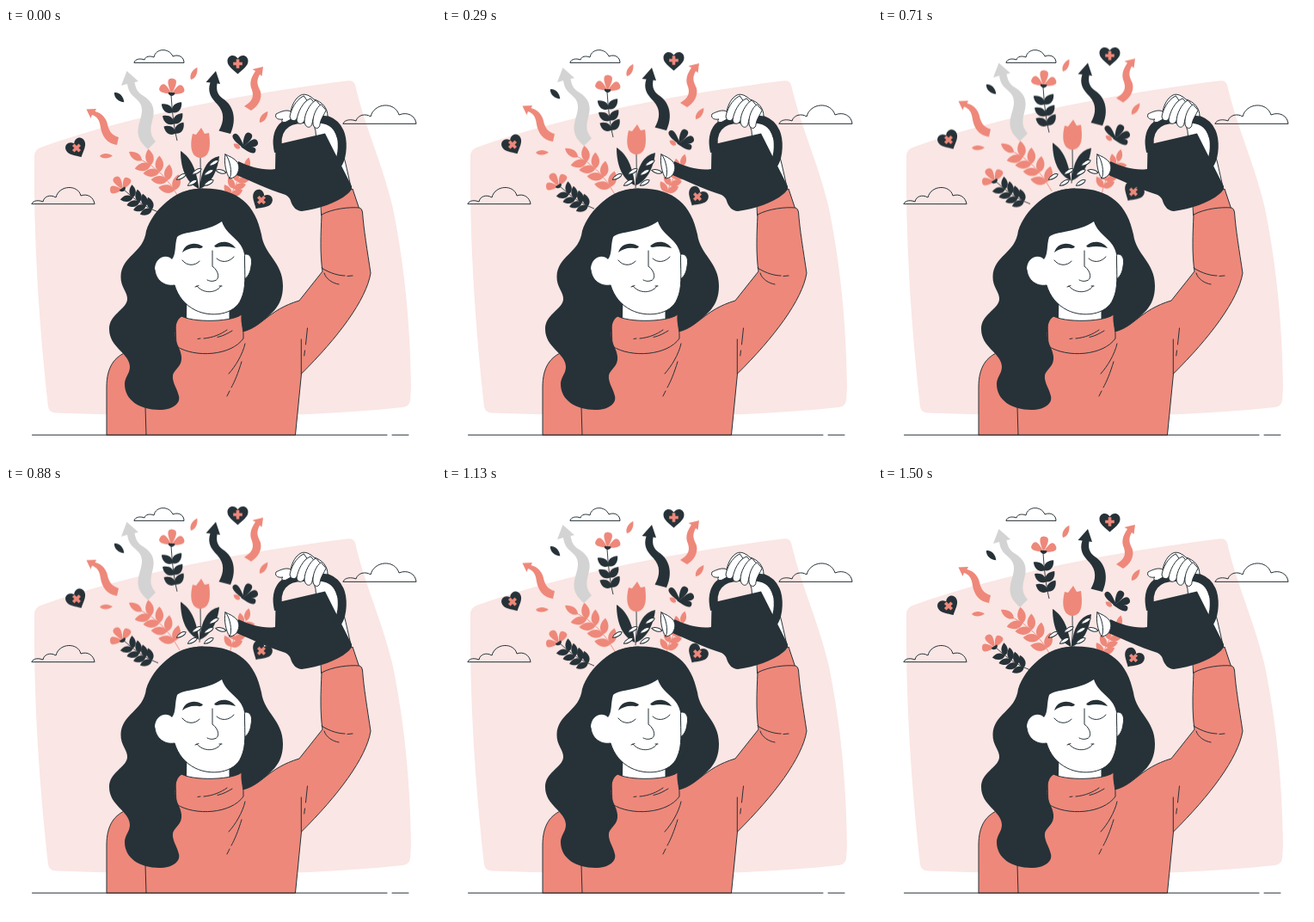
Animation, 500 px wide and 500 px high, one loop 1.54 s. Source, as an HTML page:

```html
<!DOCTYPE html>
<html lang="en">
<head>
<meta charset="utf-8">
<title>Watering thoughts</title>
<style>
html, body { margin: 0; width: 100%; height: 100%; overflow: hidden; background: #fff; }
svg { display: block; width: 100vw; height: 100vh; }
.dark { fill: #263238; }
.coral { fill: #ee887a; }
.grey { fill: #d3d3d3; }
.white { fill: #fff; }
.none { fill: none; }
.line { stroke: #263238; stroke-width: 1; stroke-linecap: round; stroke-linejoin: round; }
.stem { fill: none; stroke: #263238; stroke-width: .9; }
.stem.pale { stroke: #ee887a; }
#drops { stroke-width: .7; }
</style>
</head>
<body>
<svg viewBox="0 0 500 500">
  <path fill="#fae6e4" d="M33 149Q33 142 40 139C150 100 280 76 396 61.500Q404 60 406 66C417 115 437 155 450 210C463 275 470 340 471 418L470 433Q469 440 461 441C330 455 200 452 57 447.500Q50 447 49 440C39 350 32 250 33 149Z"/>

  <g class="none line">
    <path d="M149 40C150 36 156 35 161 37C162 33 167 32 172 34C174 23 190 23 194 33C201 30 207 34 207 40Z"/>
    <path d="M392 111C394 106 402 106 407 108C409 101 418 99 424 103C428 87 452 85 457 101C467 97 476 102 477 111Z"/>
    <path d="M30 204.300C32 200 38 200 43 202C44 196 51 193 58 197C62 182 84 182 87 195C95 192 102 197 103 204.300Z"/>
  </g>

  <g id="ideas">
    <path class="grey" d="M140.500 50L154 62L149.500 63C151 71 153 75 160 79C171 86 174 95 170 108C167 119 168 125 174 132L165 141C156 133 152 126 154 115C156 105 162 94 154 85C149 79 143 78 141 65L134 67Z"/>
    <path class="dark" d="M244 50L249 65L245.500 64.500C244 74 247 78 252 82C266 91 268 108 261 123L247.500 119.500C254 108 254 98 246 89C238 81 234 74 237.500 63.500L232.500 63Z"/>
    <path class="coral" d="M299 45L297.500 56L295 54C290 63 293 67 296 74C298 83 293 91 285 96L277 91C285 86 289 81 286 72C283 65 284 59 290 50L286.500 48Z"/>
    <path class="coral" d="M93.500 94.500L105 94L103.500 97C112 99 117 106 118 112C120 121 124 125 131 127L129 136C117 134 112 126 110 116C109 107 106 103 100 101L98.500 105Z"/>
  </g>

  <g id="drops" class="white"></g>

  <!-- raised arm, cuff and watering can -->
  <path class="white line" d="M352 92L369 94C379 109 390 137 395 158L402 189L367 200L360 120Z"/>
  <path class="coral line" d="M366 198C380 197 394 193 403 187L411 211L367 218Z"/>
  <path class="dark" d="M313.500 139Q313.500 136 317 135L371 122.500L402 184Q403 188 397 193C384 204 364 210 344 213C338 213 333 208 331 201Q330 197 325 194C303 187 285 178 268 171L270 155C285 162 300 166 313 164Z"/>
  <path class="none" stroke="#263238" stroke-width="10" d="M317 144C311 118 325 106 345 106C371 103 382 108 388 121C392 130 392 148 386 158"/>
  <path class="white line" d="M255 147C260 149 266 152 269 156C272 161 271 166 268 171C265 174 262 175 260 175C256 169 253 156 255 147Z"/>
  <path class="none line" d="M255 147C260 151 264 169 260 175"/>
  <path class="white line" d="M331 97C326 94 318 98 314 100C312 105 317 107 322 106C319 108 322 111 326 109L335 104C345 100 357 99 365 102L374 103C374 93 368 86 358 83C353 78 347 76 343 78C337 81 333 88 331 97Z"/>
  <g class="white line">
    <path d="M346 79C337 83 331 96 330 103C331 109 337 109 339 104C341 97 346 91 350 85Z"/>
    <path d="M354 82C345 85 339 99 338 107C339 113 345 112 347 108C349 100 354 94 358 87Z"/>
    <path d="M360 84C353 88 347 100 347 109C348 117 355 117 356 111C357 103 362 96 366 91Z"/>
    <path d="M366 89C361 92 356 103 357 112C359 119 365 117 365 112C366 105 370 101 372 96Z"/>
  </g>

  <!-- back hair -->
  <path class="dark" d="M229 186.500C270 186 290 206 297 240C300 264 322 272 322 300C322 326 305 333 301 340L290 354L198 362L170 225C185 200 200 187 229 186.500Z"/>

  <!-- sweater -->
  <path class="coral line" d="M117 473L117 418C117 394 126 382 142 376L200 355L275 353C298 348 304 328 341 317L368 283C365 262 366 240 367 217C380 210 399 208 411 209Q414 210 414.500 214C416 235 420 258 424 285C419 316 386 360 343.500 402L336.500 473Z"/>
  <path class="white" d="M209 312L209 342L260 342L260 318Z"/>
  <path class="none line" d="M209.500 318V340M260 322V340"/>
  <path class="coral line" d="M201 332C206 343 262 343 274 333C273 344 277 352 276 361C262 381 220 384 198 370L197 345Z"/>
  <g class="none line">
    <path d="M343.300 362V402M350.500 349L348.500 368M347.500 375L346.800 381M162 440L163 473"/>
    <path d="M367 279C378 286 388 288 394 288M397 288.500L403 288M370 285C372 292 380 297 387 298"/>
    <path d="M223 361.500L226 361M230 361C241 360 250 356 257 351M246 359.500C253 358 258 355 263 352"/>
    <path d="M278 367C275 380 267 393 259 402M274 388C270 401 266 411 262 418M260 422L257 428"/>
  </g>

  <!-- front hair and long lock -->
  <path class="dark" d="M229 186.500C197 187 171 211 163 236C160 262 134 265 133.500 289C133 301 142 308 141 316C139 328 120 333 120 350C120 372 144 378 144 394C144 402 138 406 138 414C138 433 156 444 178 444C195 444 203 436 201 428C199 419 193 412 194 404C196 396 205 394 204 382C203 371 195 366 197 350C198 340 203 333 210 335L212 240L260 230Z"/>

  <!-- face -->
  <path class="white line" d="M278 263C284 262 287 268 285 277C284 285 281 290 277 292Z"/>
  <path class="white" d="M251 225C257 243 275 245 277.500 265C277.500 288 279.500 302 273.500 315C266 334 238 337 220 328C208 322 200 312 196 299C184 301 174 293 173 281C173 267 186 262 193 269C198 263 196 252 199 243C206 236 232 238 251 225Z"/>
  <path class="none line" d="M277.500 265C277.500 288 279.500 302 273.500 315C266 334 238 337 220 328C208 322 200 312 196 299C184 301 174 293 173 281"/>
  <path class="dark" d="M205 261C208 250 220 248 229 254C228 256 226 256.500 224 256C216 255 210 257 205 261ZM242.500 253C250 246 262 248 267 256C260 254 253 253 245 255C243 255 242 254 242.500 253Z"/>
  <g class="none line">
    <path d="M205 270C210 277 220 277 225 271M245 268C250 273 259 273 265 266"/>
    <path d="M240 259L240 277C248 283 249 293 242 294C239 295 236 294 234 293"/>
    <path d="M222 300C229 309 244 309 250 300M220 301L224 299.500M248 300L251 300"/>
  </g>

  <path class="none line" d="M30.500 473.200H443M449 473.200H468"/>
</svg>
<script>
const ideas = document.getElementById('ideas');
const drops = document.getElementById('drops');

function add(parent, cls, d, transform) {
  const path = document.createElementNS(parent.namespaceURI, 'path');
  path.setAttribute('class', cls);
  path.setAttribute('d', d);
  if (transform) path.setAttribute('transform', transform);
  parent.append(path);
}

const place = (x, y, turn) => `translate(${x} ${y}) rotate(${turn})`;

// Pointed leaf from its base, along the given angle.
function leaf(x, y, turn, len, wide, cls) {
  add(ideas, cls, `M0 0C${len * .25} ${-wide} ${len * .7} ${-wide * .8} ${len} 0C${len * .7} ${wide * .8} ${len * .25} ${wide} 0 0Z`, place(x, y, turn));
}

// Petal that widens towards a round end.
function petal(x, y, turn, len, wide, cls) {
  add(ideas, cls, `M0 0C${len * .4} ${-wide * .5} ${len} ${-wide * 1.3} ${len} 0C${len} ${wide * 1.3} ${len * .4} ${wide * .5} 0 0Z`, place(x, y, turn));
}

// Curved stem with pairs of leaves between two fractions of its length.
function sprig([x0, y0], [cx, cy], [x1, y1], pairs, from, to, len, wide, cls) {
  add(ideas, cls === 'coral' ? 'stem pale' : 'stem', `M${x0} ${y0}Q${cx} ${cy} ${x1} ${y1}`);
  for (let i = 0; i < pairs; i++) {
    const t = from + (to - from) * i / (pairs - 1), s = 1 - t;
    const x = s * s * x0 + 2 * s * t * cx + t * t * x1;
    const y = s * s * y0 + 2 * s * t * cy + t * t * y1;
    const dx = s * (cx - x0) + t * (x1 - cx), dy = s * (cy - y0) + t * (y1 - cy);
    const turn = Math.atan2(dy, dx) * 180 / Math.PI;
    for (const side of [-47, 47]) leaf(x, y, turn + side, len, wide, cls);
  }
}

function heart(x, y, turn, crossTurn) {
  add(ideas, 'dark', 'M0 12C-5 7 -12 3 -12 -3C-12 -10 -4 -12 0 -6C4 -12 12 -10 12 -3C12 3 5 7 0 12Z', place(x, y, turn));
  add(ideas, 'coral', 'M-1.800 -5.300H1.800V-1.800H5.300V1.800H1.800V5.300H-1.800V1.800H-5.300V-1.800H-1.800Z', place(x, y, crossTurn));
}

function bloom(x, y, turn, size) {
  for (const [a, len] of [[-58, 1], [0, 1.150], [58, 1]])
    petal(x, y, turn + a, size * len, size * .42, 'coral');
  add(ideas, 'dark', 'M-2 0C-1 -4 1 -4 2 -3.500V3.500C1 4 -1 4 -2 0Z', place(x, y, turn));
}

heart(269.500, 41.500, 0, 0);
heart(82, 139.500, -28, 45);
heart(297, 200, 32, 45);

leaf(126, 75, 45, 16, 5, 'dark');
leaf(215, 60, -63, 16, 4.500, 'coral');
leaf(109, 149, -2, 15, 4, 'coral');
leaf(295, 110, -54, 16, 4.500, 'coral');

sprig([199, 131], [194, 112], [192, 78], 3, .2, .68, 16, 6.500, 'dark');
bloom(192.500, 77, -87, 16);
sprig([177, 214], [157, 207], [136, 187], 4, .18, .72, 15, 5.500, 'dark');
bloom(136, 188, -122, 15);

sprig([202, 199], [184, 165], [155, 152], 4, .16, .76, 19, 7, 'coral');
leaf(158, 154, 214, 18, 6, 'coral');
sprig([260, 203], [263, 183], [279, 165], 4, .2, .85, 15, 5.500, 'coral');
leaf(279, 165, -77, 15, 5, 'coral');

leaf(272, 140, -145, 9, 4, 'coral');
petal(278, 141, -127, 22, 5, 'dark');
petal(275, 139, -62, 19, 6, 'dark');
petal(275, 139, -22, 19, 6, 'dark');
petal(273, 138, 16, 18, 5, 'dark');

add(ideas, 'stem', 'M226 150Q227 170 225 190');
add(ideas, 'dark', 'M203 143C214 150 221 162 224.500 187C211 181 203 166 203 143Z');
add(ideas, 'dark', 'M248 149C234 152 227 165 225 187C238 182 246 167 248 149Z');
add(ideas, 'coral', 'M217 123L221 124L227 116L231 123L236 122C238 136 238 150 226 151C214 150 214 135 217 123Z');

for (const [x, y] of [[204, 173], [222, 167], [217, 180], [236, 168], [236, 180], [242, 157], [250, 167]])
  add(drops, 'line', 'M-6.500 0C-3 -3 4 -3 6 0C4 2.500 -3 2.500 -6.500 0Z', place(x, y, x === 250 ? 14 : -30));

// Straight rise and fall, then a short rest before the loop.
const loop = 1540;
ideas.animate(
  [[0, 0], [750, -10], [1500, 0], [loop, 0]].map(([time, y]) => ({
    offset: time / loop, transform: `translateY(${y}px)`
  })),
  { duration: loop, iterations: Infinity, easing: 'linear' }
);
</script>
</body>
</html>
```
